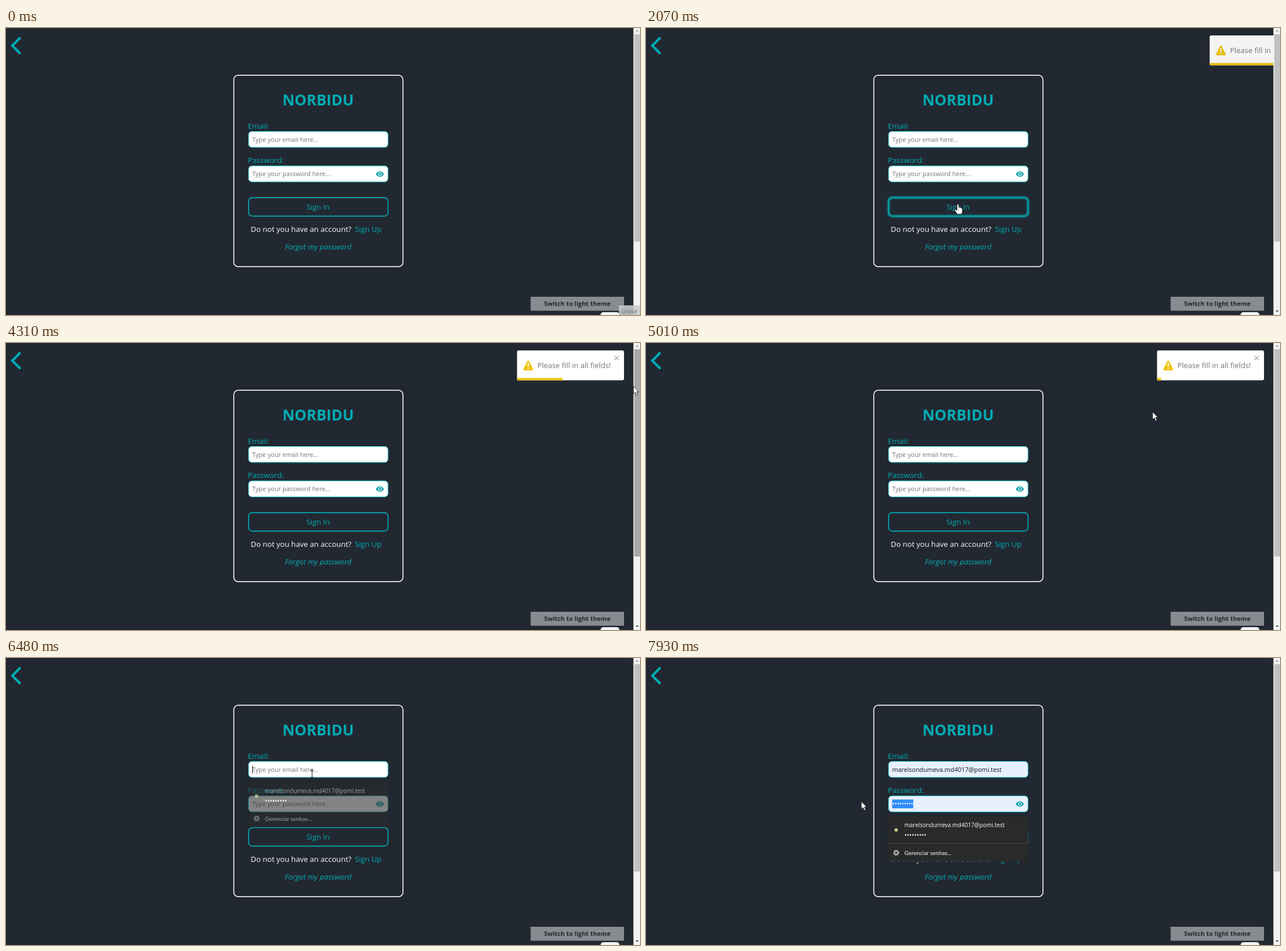
Recreate the animation shown at these times as an HTML page. Size 1110 px wide and 504 px high, loop 8000 ms.

```html
<!DOCTYPE html>
<html lang="en">
<head>
<meta charset="utf-8">
<title>Sign in</title>
<style>
  html, body { margin: 0; width: 100%; height: 100%; overflow: hidden; background: #222831; }
  svg { display: block; width: 1110px; height: 504px; }
  text { font: 13.1px "Open Sans", "Noto Sans", sans-serif; fill: #00adb5; white-space: pre; }
  .mid { text-anchor: middle; }
  .title { font-size: 26.2px; font-weight: 700; }
  .field { font-size: 10.93px; fill: #757575; }
  .value { fill: #111; }
  .box { fill: #fff; stroke: #00adb5; stroke-width: 1; }
  .menu text { font-size: 10px; fill: #fff; }
</style>
</head>
<body>
<svg viewBox="0 0 1110 504">
  <defs>
    <filter id="blur" x="-10%" y="-40%" width="120%" height="180%"><feGaussianBlur stdDeviation="1.6"/></filter>
    <g id="menuBody" class="menu">
      <rect x="423" y="277" width="247" height="82" rx="2" fill="#000" opacity=".22"/>
      <rect x="424" y="277.5" width="245" height="80" fill="#292a2b"/>
    </g>
    <g id="menuItems" class="menu">
      <path d="M424 325.5H669" stroke="#434446"/>
      <circle cx="438" cy="302" r="3" fill="#b9c98a"/>
      <text x="452.5" y="297" class="mail">marelsondumeva.md4017@pomi.test</text>
      <text x="452.5" y="315" style="font-size:11.4px">•••••••••</text>
      <circle cx="438" cy="342" r="3" fill="none" stroke="#a5a7aa" stroke-width="2.4"/>
      <circle cx="438" cy="342" r="4.6" fill="none" stroke="#a5a7aa" stroke-width="1.5" stroke-dasharray="2.2 1.41"/>
      <text x="452.5" y="346" style="font-family:Lato,sans-serif">Gerenciar senhas...</text>
    </g>
  </defs>

  <rect width="1110" height="504" fill="#222831"/>
  <path d="M24 18L11 31L24 44" fill="none" stroke="#00adb5" stroke-width="4.2" stroke-linecap="round"/>

  <rect x="398.8" y="82.8" width="296.2" height="336.4" rx="8" fill="none" stroke="#eee" stroke-width="1.7"/>
  <text x="546.5" y="136" class="mid title">NORBIDU</text>

  <text x="423.6" y="176.6">Email:</text>
  <rect id="mailBox" class="box" x="424.5" y="181.5" width="244.5" height="28.3" rx="6"/>
  <text id="mailText" class="field" x="431" y="199.8"></text>
  <path id="caret" stroke="#111" d="M0 189V203"/>

  <text x="423.6" y="237.2">Password:</text>
  <rect id="passBox" class="box" x="424.5" y="242" width="244.5" height="28.3" rx="6"/>
  <rect id="sel" x="431" y="248.5" height="15.5" fill="#308dfc"/>
  <text id="passText" class="field" x="431" y="260.3"></text>
  <path d="M647.5 256.5C650.5 250.2 658.500 250.2 661.500 256.5C658.500 262.8 650.500 262.8 647.5 256.5Z" fill="#0a9fa8"/>
  <circle cx="654.5" cy="256.5" r="2.7" fill="#0a9fa8" stroke="#fff" stroke-width="1.1"/>

  <rect id="glow" x="424.8" y="297.8" width="244" height="32.6" rx="6.5" fill="none" stroke="#00adb5" stroke-width="4" filter="url(#blur)"/>
  <rect x="424.8" y="297.8" width="244" height="32.6" rx="6.5" fill="none" stroke="#00adb5" stroke-width="1.7"/>
  <text x="546.3" y="318.8" class="mid">Sign In</text>

  <text x="428.6" y="358.300" style="fill:#fff">Do not you have an account?</text>
  <text x="610.8" y="358.3">Sign Up</text>
  <text x="546.5" y="389.3" class="mid" font-style="italic" style="font-style:italic">Forgot my password</text>

  <rect x="918.5" y="472" width="163.5" height="24.5" fill="#888b90"/>
  <text x="1000.2" y="488.4" class="mid" style="font-size:10.93px;font-weight:700;fill:#222831">Switch to light theme</text>
  <rect x="1041" y="499" width="33" height="14" rx="5" fill="#f4f4f4"/>

  <g id="toast">
    <rect x="894.700" y="13" width="187.3" height="52.5" rx="3.3" fill="#fff"/>
    <path d="M914.3 32.500L921.3 46.3H907.3Z" fill="#f1c40f" stroke="#f1c40f" stroke-width="3.2" stroke-linejoin="round"/>
    <path d="M914.3 36V40.800M914.3 44.3V44.4" stroke="#fff" stroke-width="2" stroke-linecap="round"/>
    <text x="930.3" y="44.2" style="fill:#757575">Please fill in all fields!</text>
    <path d="M1065.5 23L1072.5 30M1072.5 23L1065.5 30" stroke="#aaa" stroke-width="1.3"/>
    <rect id="bar" x="894.7" y="61.5" height="4" fill="#f1c40f"/>
  </g>

  <rect x="1098.5" width="11.5" height="504" fill="#f1f1f1"/>
  <rect id="thumb" x="1100" y="11" width="10" height="364"/>
  <path d="M1102.300 6.500L1105 3.500L1107.700 6.500Z" fill="#a3a3a3"/>
  <path d="M1102.3 496L1105 499L1107.7 496Z" fill="#505050"/>
  <g id="tip">
    <rect x="1073" y="487" width="37" height="17" fill="#c9cacc" opacity=".88"/>
    <text x="1077" y="501" style="font-size:10px;fill:#707070">Grava</text>
  </g>

  <g id="menuA">
    <use href="#menuBody"/>
    <rect x="424" y="277.5" width="245" height="48" fill="#3e3f40" id="hot"/>
    <use href="#menuItems"/>
  </g>
  <g id="menuB"><use href="#menuBody"/><use href="#menuItems"/></g>

  <g id="cursor">
    <path id="arrow" d="M0 0V13.3L3.1 10.5L5.300 15.7L7.600 14.700L5.400 9.700H9.300Z" fill="#fff" stroke="#111" stroke-width=".8"/>
    <path id="beam" d="M-2.5 -6.5H-1Q0 -6.500 0 -5.500Q0 -6.500 1 -6.500H2.500M0 -5.500V5.500M-2.500 6.500H-1Q0 6.500 0 5.500Q0 6.500 1 6.500H2.500" fill="none" stroke="#111"/>
    <path id="hand" d="M-1.500 1Q0 -1 1.500 1V6Q3 5 4 6.500Q5.500 6 6 7.300Q8 7 8 9V13L6.500 18H-1L-5.500 11Q-5.500 8.500 -3.200 9.800L-1.500 11.500Z" fill="#fff" stroke="#111" stroke-width=".8"/>
  </g>
</svg>
<script>
const LOOP = 8000;
const MAIL = 'marelsondumeva.md4017@pomi.test';
const DOTS = '•'.repeat(9);
const el = {};
document.querySelectorAll('svg [id]').forEach(n => el[n.id] = n);

// time, x, y of the pointer
const PATH = [
  [470, 1027, 496], [640, 960, 440], [900, 760, 330], [1090, 640, 286], [1230, 585, 299],
  [1440, 546, 309], [3640, 546, 309], [3750, 560, 300], [3960, 800, 200], [4100, 973, 124],
  [4240, 1085, 86], [4310, 1098.5, 76], [4400, 1099, 76], [4520, 1085, 80], [4800, 1000, 100],
  [5080, 850, 128], [5360, 656, 148], [5570, 567.5, 188], [5700, 540, 205], [5900, 530, 270],
  [6020, 540, 284], [6190, 545, 230], [6300, 540, 196], [6420, 540, 196], [6600, 528, 218],
  [6800, 517, 239], [7230, 517, 239], [7380, 520, 254], [7500, 520, 256], [7860, 377, 252], [8000, 377, 252]
];

const clamp = (v, a, b) => Math.min(b, Math.max(a, v));
const ramp = (t, a, b) => clamp((t - a) / (b - a), 0, 1);
const mix = (a, b, p) => a + (b - a) * p;
const set = (n, o) => { for (const k in o) n.setAttribute(k, o[k]); };
const show = (n, on) => n.style.display = on ? '' : 'none';

// cubic-bezier(.215,.61,.355,1)
function easeOut(p) {
  const bez = (u, a, b) => 3 * u * (1 - u) ** 2 * a + 3 * u * u * (1 - u) * b + u ** 3;
  let lo = 0, hi = 1;
  for (let i = 0; i < 24; i++) {
    const m = (lo + hi) / 2;
    if (bez(m, .215, .355) < p) lo = m; else hi = m;
  }
  return bez(lo, .61, 1);
}

function pointer(t) {
  const i = PATH.findIndex(k => k[0] > t);
  if (i < 1) return { x: 1027, y: 496 };
  const a = PATH[i - 1], b = PATH[i], p = (t - a[0]) / (b[0] - a[0]);
  return { x: mix(a[1], b[1], p), y: mix(a[2], b[2], p) };
}

function drawToast(t) {
  const start = 1790, out = 5080, span = 700;
  show(el.toast, t >= start && t < 5370);
  const keys = [[0, 3000], [.6, -25], [.75, 10], [.9, -5], [1, 0]];
  let dx = 0, alpha = 1;
  const p = (t - start) / span;
  if (p >= 0 && p < 1) {
    const i = keys.findIndex(k => k[0] > p);
    const [a, b] = [keys[i - 1], keys[i]];
    const e = easeOut((p - a[0]) / (b[0] - a[0]));
    dx = mix(a[1], b[1], e);
    if (i === 1) alpha = e;
  } else if (t > out) {
    const q = (t - out) / span;
    dx = q < .2 ? -100 * q : mix(-20, 2000, ((q - .2) / .8) ** 1.2);
    alpha = 1 - ramp(q, .2, 1);
  }
  set(el.toast, { transform: `translate(${dx * .82} 0)`, opacity: alpha });
  const left = t < 4310 ? 187.3 - 59.3 * Math.max(0, t - 2497) / 1000 : mix(80, 0, ramp(t, 4310, out));
  set(el.bar, { width: left });
}

function drawForm(t, c) {
  const filled = t >= 6700;
  const bg = filled ? '#e8f0fe' : '#fff';
  el.mailBox.style.fill = el.passBox.style.fill = bg;
  el.mailText.textContent = filled ? MAIL : 'Type your email here...';
  el.passText.textContent = filled ? DOTS : 'Type your password here...';
  el.mailText.classList.toggle('value', filled);
  el.passText.classList.toggle('value', filled);

  show(el.caret, t >= 6330 && t < 7500);
  const end = filled ? el.mailText.getComputedTextLength() : 0;
  set(el.caret, { transform: `translate(${431.5 + end} 0)` });

  const width = t > 7500 ? 468 - clamp(c.x, 431, 468) : 0;
  set(el.sel, { x: 468 - width, width });
  el.passText.style.fill = width ? '#fff' : '';

  set(el.glow, { opacity: .75 * ramp(t, 1230, 1580) * (1 - ramp(t, 3780, 4000)) });
}

function drawMenus(t) {
  const a = ramp(t, 6400, 6540) * (1 - ramp(t, 7160, 7410));
  set(el.menuA, { opacity: a, transform: 'translate(.7 -60.3)' });
  show(el.hot, t >= 6620);
  set(el.menuB, { opacity: ramp(t, 7500, 7640) });
  return a;
}

function drawPointer(t, c, menu) {
  const within = (y1, y2) => c.x > 424 && c.x < 669 && c.y > y1 && c.y < y2;
  const overMenu = menu > 0 && within(217, 298);
  let kind = 'arrow';
  if (!overMenu) {
    if (within(181, 210) || within(242, 271)) kind = 'beam';
    else if (within(297, 331)) kind = 'hand';
  }
  for (const k of ['arrow', 'beam', 'hand']) show(el[k], k === kind);
  show(el.cursor, t >= 470);
  set(el.cursor, { transform: `translate(${c.x} ${c.y})` });
}

function draw(t) {
  const c = pointer(t);
  show(el.tip, t < 70);
  set(el.thumb, { fill: t > 4270 && t < 4480 ? '#a8a8a8' : '#c1c1c1' });
  drawToast(t);
  drawForm(t, c);
  drawPointer(t, c, drawMenus(t));
}

const begin = performance.now();
function tick() {
  draw((performance.now() - begin) % LOOP);
  requestAnimationFrame(tick);
}
tick();
</script>
</body>
</html>
```
